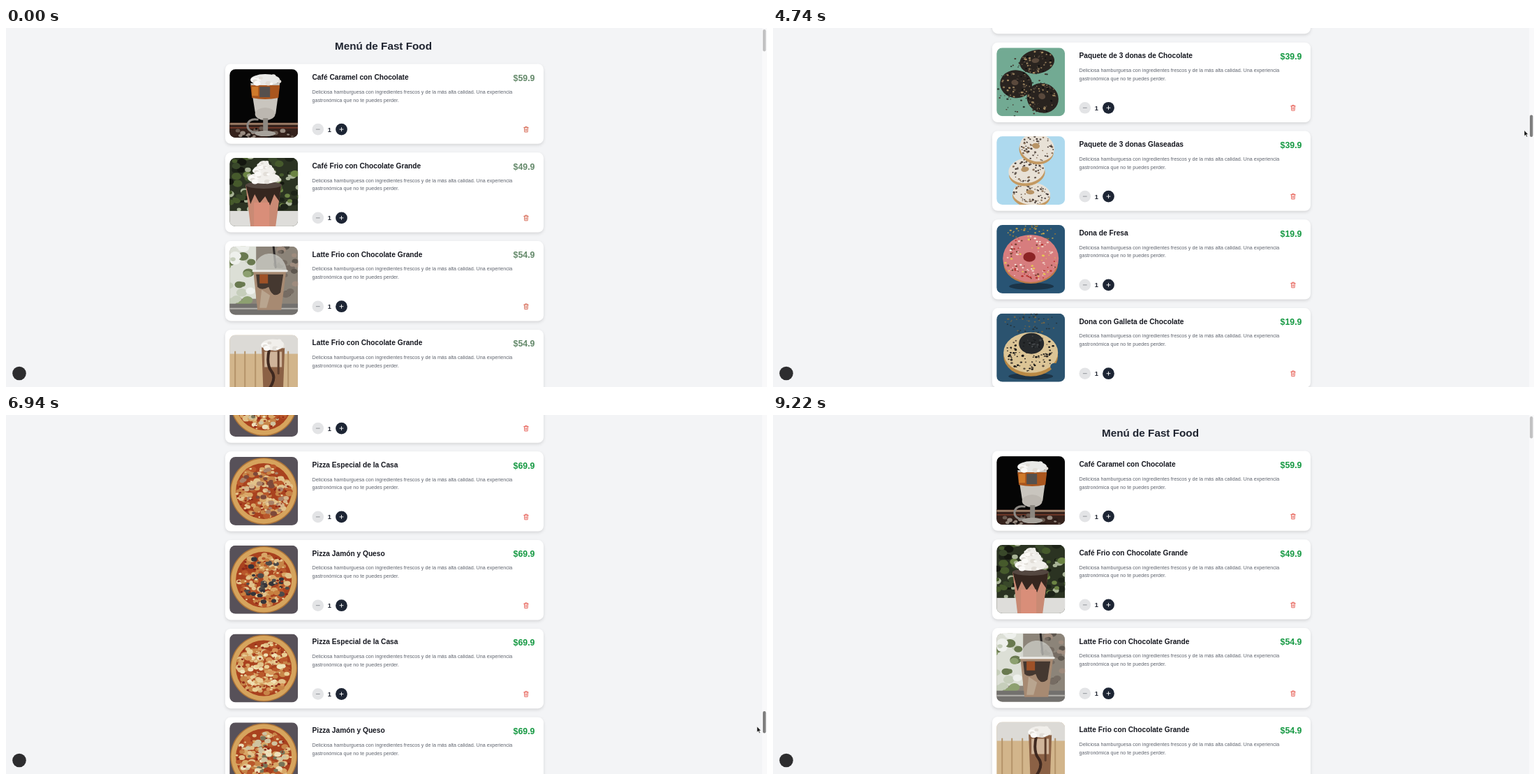
Recreate the animation shown at these times as an HTML page. Size 1090x514 px, loop 9400 ms.

```html
<!DOCTYPE html>
<html lang="es">
<head>
<meta charset="utf-8">
<title>Menú</title>
<style>
html, body { margin: 0; width: 100%; height: 100%; overflow: hidden; background: #f3f4f6; }
svg { position: fixed; inset: 0; width: 100%; height: 100%; display: block; }
text { font-family: "Liberation Sans", Arial, sans-serif; }
.heading { font-size: 15.25px; font-weight: 700; fill: #1f2430; }
.title { font-size: 10.2px; font-weight: 700; fill: #15171f; }
.desc { font-size: 7.16px; fill: #5f646e; }
.price { font-size: 12.3px; font-weight: 700; text-anchor: end; fill: var(--price); }
.count { font-size: 9.3px; font-weight: 700; text-anchor: middle; fill: #1f2430; }
.trash { fill: none; stroke: var(--trash); stroke-width: .85; stroke-linecap: round; stroke-linejoin: round; }
.panel { filter: drop-shadow(0 2.5px 2px rgba(0, 0, 0, .12)); }
</style>
</head>
<body>
<svg id="stage" viewBox="0 0 1090 514" xmlns="http://www.w3.org/2000/svg">
  <defs><clipPath id="photo"><rect width="98" height="98" rx="8.5"/></clipPath></defs>
  <rect width="1090" height="514" fill="#f3f4f6"/>
  <g id="page"><text class="heading" x="471" y="31">Menú de Fast Food</text></g>
  <rect x="1083" width="7" height="514" fill="#f9f9fa"/>
  <rect id="thumb" x="1084" width="4.4" height="31.5" rx="2.2"/>
  <circle cx="19" cy="494.5" r="9.8" fill="#2d2d2f"/>
  <path id="cursor" d="M0 0V8.3L1.9 6.6L3.2 9.6L4.6 9L3.3 6.1H5.8Z" fill="#111" stroke="#fff" stroke-width=".6"/>
</svg>
<script>
const LOOP = 9400, PITCH = 126.8, FIRST_TOP = 51.5, COUNT = 67, MAX_SCROLL = 8009.9;
const STEP = 92, STEP_ORIGIN = 3816;

// ---- drawing helpers -------------------------------------------------
function random(seed) {
  let s = seed * 7919 + 17;
  return () => (s = (s * 16807) % 2147483647) / 2147483647;
}
const box = (x, y, w, h, fill) => `<rect x="${x}" y="${y}" width="${w}" height="${h}" fill="${fill}"/>`;
const oval = (x, y, rx, ry, fill) => `<ellipse cx="${x}" cy="${y}" rx="${rx}" ry="${ry}" fill="${fill}"/>`;
const shape = (d, fill) => `<path d="${d}" fill="${fill}"/>`;
const line = (d, color, width) =>
  `<path d="${d}" fill="none" stroke="${color}" stroke-width="${width}" stroke-linecap="round" stroke-linejoin="round"/>`;
const turn = (angle, x, y, art) => `<g transform="translate(${x} ${y}) rotate(${angle})">${art}</g>`;

// Scatters small ovals over an elliptical area; inner is the empty part of the radius.
function scatter(seed, n, x, y, rx, ry, size, colors, inner = 0) {
  const rnd = random(seed);
  let art = '';
  for (let i = 0; i < n; i++) {
    const a = rnd() * Math.PI * 2, r = inner + (1 - inner) * Math.sqrt(rnd()), s = size * (.6 + rnd() * .8);
    art += oval((x + Math.cos(a) * r * rx).toFixed(1), (y + Math.sin(a) * r * ry).toFixed(1),
      s.toFixed(1), (s * .75).toFixed(1), colors[i % colors.length]);
  }
  return art;
}
const glass = (x1, x2, top, x3, x4, bottom, fill) => shape(`M${x1} ${top}H${x2}L${x4} ${bottom}H${x3}Z`, fill);
const foam = (x, y, rx, ry, color = '#f1efeb') =>
  oval(x, y, rx, ry, color) + scatter(5, 12, x, y, rx, ry, ry * .45, [color, '#e2ded8', '#fbfaf8']);
const straw = (d, dark, light) => line(d, light, 5) +
  `<path d="${d}" stroke="${dark}" stroke-width="5" stroke-dasharray="4 4" fill="none"/>`;
function donut(x, y, rx, ry, glaze, hole, sprinkles, seed, n = 55) {
  return oval(x, y, rx, ry, glaze) + scatter(seed, n, x, y, rx * .94, ry * .94, 1.3, sprinkles, .25) +
    oval(x - 2, y - 2, rx * .22, ry * .2, hole);
}
// A cake slice seen from above: tip, back corner and right corner of its top, then the side below.
function slice(tipX, tipY, backX, backY, endX, endY, depth) {
  return shape(`M${tipX} ${tipY}L${endX} ${endY}V${endY + depth}L${tipX + 3} ${tipY + depth}Z`, '#3f3e42') +
    line(`M${tipX + 2} ${tipY + depth / 2}L${endX} ${endY + depth / 2}`, '#6e6559', 2) +
    shape(`M${tipX} ${tipY}L${backX} ${backY}L${endX} ${endY}Z`, '#d9a860') +
    line(`M${tipX} ${tipY + 1}L${endX} ${endY + 1}`, '#ecca8f', 2) +
    oval(endX * .6 + backX * .4 - 4, endY * .6 + backY * .4 + 3, 7, 5, '#474346');
}

// ---- photos, each on a 98 x 98 square --------------------------------
const photos = {
  irish: () => box(0, 0, 98, 98, '#050505') + box(0, 76, 98, 22, '#35221c') + box(0, 77, 98, 2.5, '#a2836b') +
    box(0, 83, 98, 1.5, '#7e3f2c') + scatter(3, 36, 50, 92, 50, 8, 3, ['#17110f', '#6a5a50', '#2a1c18', '#978a80']) +
    line('M40 72C22 68 20 92 40 90', '#8d8984', 3) +
    glass(30, 72, 20, 37, 66, 64, '#c9c5be') + oval(51, 64, 14.5, 9, '#bcb7b0') +
    shape('M30 23H72L70 41Q51 45 32 41Z', '#a9561e') + box(43, 25, 15, 15, '#55504d') + box(32, 25, 9, 13, '#cf7a2b') +
    box(48, 70, 7, 19, '#8c8780') + oval(51, 92, 15, 4, '#a7a29b') + foam(51, 15, 21, 8, '#e9e9e7'),
  frappe: () => box(0, 0, 98, 98, '#2b3322') +
    scatter(8, 100, 49, 36, 58, 50, 5, ['#465a2c', '#1d2318', '#6c8444', '#39482a', '#a9b497', '#14170f']) +
    box(0, 76, 98, 22, '#deddda') + glass(23, 74, 38, 30, 66, 98, '#c98a74') +
    shape('M23 38H74L71 62L64 52L58 68L51 55L43 65L36 52L30 66Z', '#35261f') + box(35, 64, 22, 34, '#d98e79') +
    oval(49, 39, 26, 5, '#544740') + foam(49, 29, 23, 8) + foam(49, 18, 15, 8) + foam(49, 10, 8, 6),
  latte: () => box(0, 0, 98, 98, '#8c8479') + box(0, 0, 38, 75, '#dcdfd6') +
    scatter(4, 26, 15, 40, 24, 46, 6, ['#8da070', '#eef0ec', '#69794f', '#c6cebb']) +
    scatter(9, 26, 84, 34, 18, 36, 5, ['#766c63', '#9e8b7d', '#5e574f']) + box(0, 82, 98, 16, '#73716e') +
    line('M0 89H98', '#b3b1ac', 2) + glass(34, 81, 35, 40, 74, 91, '#a78a72') +
    shape('M38 40H77L73 66Q62 76 56 58Q46 64 40 58Z', '#453830') + box(43, 40, 12, 13, '#9e5127') +
    shape('M46 62L58 70L53 88H43Z', '#b9a58f') + line('M63 0L66 30', '#292524', 3) +
    shape('M34 35C37 2 78 2 82 35Z', '#d4d5d0b0') + line('M34 35H82', '#ecebe7', 3),
  fence: () => box(0, 0, 98, 98, '#d2b58b') + box(0, 0, 98, 27, '#dcdad6') +
    [8, 22, 37, 84].map(x => line(`M${x} 24V98`, '#b5946a', 2)).join('') +
    glass(46, 79, 18, 49, 76, 98, '#8b6145') + box(50, 24, 25, 22, '#cfb49a') +
    line('M57 20Q52 42 60 52T56 78', '#3e281f', 4) + line('M70 24V55', '#5c3d2c', 3) + foam(62, 14, 16, 8),
  tall: () => box(0, 0, 98, 98, '#77757b') + scatter(6, 50, 49, 40, 55, 50, 5, ['#6b696f', '#838188']) +
    box(0, 87, 98, 11, '#54392c') + glass(23, 72, 5, 32, 65, 94, '#a5a09c') + glass(27, 68, 19, 33, 63, 84, '#b48657') +
    line('M51 10Q46 38 53 62', '#251b1a', 5) + foam(48, 15, 19, 7) + line('M68 97L94 94', '#a03a25', 2),
  mocha: () => box(0, 0, 98, 98, '#b4b8c1') + box(0, 88, 98, 10, '#5f4538') + line('M60 1L52 11', '#403c3b', 3) +
    glass(8, 57, 13, 14, 51, 90, '#cbbfb1') + glass(10, 55, 22, 15, 50, 85, '#ab804f') +
    glass(27, 40, 26, 29, 38, 84, '#57504f') + line('M45 28L43 80', '#c59b68', 4) + oval(33, 17, 22, 5, '#e0cdb3') +
    scatter(3, 26, 70, 83, 28, 6, 5, ['#8a5329', '#b57a42', '#4f2f1e', '#6c3d23']),
  capuchino: () => box(0, 0, 98, 98, '#26242b') + box(0, 68, 98, 30, '#403f47') +
    shape('M27 11H87C84 55 82 89 60 91C38 90 31 48 27 11Z', '#55535a') +
    shape('M32 20H80C79 57 75 82 55 82C40 79 34 48 32 20Z', '#d8b88a') +
    shape('M60 24H80C79 57 75 78 58 81Q54 52 60 24Z', '#55535a') +
    oval(57, 12, 29, 4, '#b9b6b6') + oval(56, 20, 24, 4, '#efdfc0') +
    line('M87 12C85 50 82 78 66 88M27 12C30 50 36 80 50 88', '#c2c0c3', 1.3),
  caramel: () => box(0, 0, 98, 98, '#e7e5e1') + box(0, 78, 98, 20, '#f0eeea') +
    shape('M76 48L98 35V82L80 84Z', '#bd8953') + straw('M27 15L52 53', '#80522f', '#ead8c0') +
    glass(38, 87, 50, 44, 80, 98, '#8c6141') + glass(41, 83, 62, 46, 77, 96, '#453a35') + box(56, 77, 6, 19, '#8a3d2a') +
    oval(62, 52, 25, 7, '#d4c0a5') + foam(62, 42, 22, 10) + foam(63, 27, 15, 10) +
    scatter(8, 40, 62, 34, 21, 18, 2, ['#bb843f', '#dfb876', '#cda66b']),
  cream: () => box(0, 0, 98, 98, '#bcbabb') + straw('M5 0L30 38', '#a83528', '#eee3dc') +
    glass(28, 88, 43, 36, 78, 98, '#9e704c') + foam(59, 36, 28, 13) + foam(62, 26, 21, 9),
  choco3: () => box(0, 0, 98, 98, '#72aa93') + scatter(2, 75, 38, 55, 38, 45, 1.2, ['#2c3931', '#473b32']) +
    [[58, 20, 25, 17, -8], [28, 52, 23, 20, 6], [66, 72, 23, 21, 24]].map(([x, y, rx, ry, a], i) =>
      turn(a, x, y, donut(0, 0, rx, ry, '#29231f', '#5a493c', ['#a68a60', '#4c4036', '#8a7656', '#111'], 20 + i))).join(''),
  glazed3: () => box(0, 0, 98, 98, '#add9ee') +
    [[50, 82, 27, 16, 4], [43, 49, 26, 18, -8], [58, 16, 25, 20, 12]].map(([x, y, rx, ry, a], i) =>
      turn(a, x, y, oval(0, 4, rx, ry, '#c39962') + donut(0, 0, rx, ry, '#e8e1d6', '#b89466', ['#453a36', '#8a725a', '#655950'], 30 + i))).join(''),
  pink: () => box(0, 0, 98, 98, '#285474') + scatter(4, 55, 50, 13, 34, 13, 1.2, ['#bca04e', '#8b743d']) +
    oval(50, 88, 32, 5, '#1b3448') + oval(49, 55, 39, 29, '#bd7947') +
    donut(49, 48, 40, 34, '#d77d7e', '#8c2425', ['#e7c554', '#f3e5dc', '#b7312c', '#efc8bd', '#754030'], 8, 110),
  cookie: () => box(0, 0, 98, 98, '#2b536f') + scatter(4, 60, 49, 14, 37, 15, 1.2, ['#6f6549', '#253641']) +
    oval(49, 90, 32, 5, '#1d3447') + oval(49, 61, 39, 29, '#b98945') + oval(49, 56, 39, 29, '#dcc596') +
    scatter(12, 100, 49, 57, 36, 26, 1.4, ['#26221f', '#594e40', '#151515']) + oval(50, 43, 18, 15, '#272a2c') +
    scatter(6, 24, 50, 42, 14, 11, 1.3, ['#44484a', '#171a1c']) + oval(83, 76, 6, 5, '#2b536f'),
  hotdog: () => box(0, 0, 98, 98, '#47464a') + oval(52, 88, 56, 14, '#2b2324') + line('M4 88Q38 97 84 91', '#962c22', 4) +
    [[36, 30], [68, 62]].map(([x, y], i) => turn(-32, x, y,
      oval(0, 11, 44, 13, '#b87838') + scatter(6 + i, 30, 0, 14, 40, 8, 3, ['#7da044', '#a2b856', '#55722d', '#c9b266']) +
      oval(0, -9, 43, 11, '#d9aa62') + oval(0, -12, 34, 5, '#e6c283') + oval(0, 1, 46, 9, '#a9482a') + oval(-3, -2, 36, 3, '#cf6e40') +
      line('M-37 0L-28 -6L-23 5L-14 -6L-8 5L0 -6L6 5L14 -6L20 5L28 -6L35 3', '#efcb70', 2.8))).join(''),
  cake: () => box(0, 0, 98, 98, '#55545a') + box(0, 0, 34, 24, '#706477') +
    slice(6, 30, 34, 2, 50, 20, 18) + slice(52, 25, 62, 0, 98, 4, 18) +
    slice(0, 67, 24, 26, 54, 46, 24) + slice(36, 76, 62, 32, 98, 46, 24),
  waffle: () => box(0, 0, 98, 98, '#343538') + shape('M0 0H75L98 70V98H50L0 82Z', '#a9a8a6') +
    oval(49, 60, 47, 35, '#94602d') + oval(49, 52, 46, 35, '#c08a45') +
    [-28, -14, 0, 14, 28].map(d => line(`M${25 + d} 30L${51 + d} 80M${18 + d} 72L${70 + d} 32`, '#91602f', 2.2)).join('') +
    scatter(2, 60, 49, 54, 43, 31, 2.2, ['#a8723a', '#d19e58', '#7b4a28', '#b88343']) +
    scatter(7, 44, 46, 38, 34, 20, 3.2, ['#252638', '#3a3842', '#6d2a27', '#1d1d28']) + foam(65, 40, 20, 12) +
    scatter(9, 18, 60, 33, 22, 14, 2.2, ['#a9342a', '#2f3041', '#c66541']),
  croissant: () => box(0, 0, 98, 98, '#535255') + scatter(5, 12, 53, 10, 40, 6, 2.5, ['#252a36', '#34343b']) +
    oval(50, 66, 49, 31, '#1e1d20') + oval(50, 62, 43, 25, '#2d2b2e') +
    [[70, 34, 28], [36, 52, 25]].map(([x, y, a]) => turn(a, x, y,
      shape('M-32 14C-34 -20 18 -30 36 13C22 10 6 19 -3 21C-12 17 -20 12 -32 14Z', '#c58845') +
      [-20, -6, 9, 22].map(d => line(`M${d} -11Q${d + 7} 2 ${d - 2} 13`, '#8a4f2a', 1.8) +
        line(`M${d + 5} -9Q${d + 9} 0 ${d + 5} 6`, '#e3b873', 3)).join('') +
      scatter(a, 16, 0, 4, 26, 11, 2, ['#a9652f', '#d59a55', '#6e3822']))).join('') +
    scatter(3, 9, 25, 93, 20, 4, 2, ['#9c3324', '#27262a']),
  burger: () => box(0, 0, 98, 98, '#4a4039') + box(0, 78, 98, 20, '#735039') + oval(49, 75, 36, 13, '#bf7e3d') +
    oval(49, 65, 39, 10, '#4d2c20') + line('M12 58Q20 65 28 58T44 58T60 58T76 58T88 58', '#789748', 6) +
    shape('M13 53H86L64 66L50 57Z', '#e1aa45') + shape('M12 54C14 10 84 10 87 54Z', '#c98743') +
    scatter(4, 24, 49, 34, 27, 13, 1.3, ['#ebd4a3']),
  pizza: (k) => {
    const plate = k === COUNT - 1;
    const toppings = [['#cfc3a0', '#777458', '#eee0bb'], ['#a98168', '#d6b58a', '#7d493a'],
      ['#34343a', '#c78040', '#4d4a49'], ['#efe1b5', '#d79559', '#e9cf95']][(k + 1) % 4];
    return box(0, 0, 98, 98, plate ? '#211f20' : '#575159') + (plate ? oval(49, 50, 52, 51, '#bcbbbb') : '') +
      oval(49, 49, 48, 48, '#ad7439') + oval(49, 49, 46.5, 46.5, '#d6a45d') + oval(49, 49, 40, 40, '#a9421f') +
      scatter(k, 120, 49, 49, 37, 37, 4, ['#d8a767', '#e1c28b', '#c78548', '#b9582b']) +
      scatter(k + 50, 46, 49, 49, 36, 36, 3.5, toppings) + scatter(k + 9, 50, 49, 49, 39, 39, 1.6, ['#8e2919', '#e9cc96']);
  }
};

// ---- menu ------------------------------------------------------------
const known = {
  0: 'Café Caramel con Chocolate|59.9|irish', 1: 'Café Frio con Chocolate Grande|49.9|frappe',
  2: 'Latte Frio con Chocolate Grande|54.9|latte', 3: 'Latte Frio con Chocolate Grande|54.9|fence',
  6: 'Café Frio con Chocolate|54.9|tall', 7: 'Café Mocha Caliente Grande con Chocolate|59.9|mocha',
  8: 'Café Caliente Capuchino Grande|59.9|capuchino', 9: 'Café Mocha Caliente Mediano|49.9|caramel',
  10: 'Café Mocha Frio con Caramelo Mediano|49.9|cream', 16: 'Paquete de 3 donas de Chocolate|39.9|choco3',
  17: 'Paquete de 3 donas Glaseadas|39.9|glazed3', 18: 'Dona de Fresa|19.9|pink',
  19: 'Dona con Galleta de Chocolate|19.9|cookie', 47: 'Paquete 2 Hot Dogs|69.9|hotdog',
  48: '4 Rebanadas de Pay de Queso|69.9|cake', 49: 'Waffle Especial|49.9|waffle',
  50: 'Croissants De la casa.jpg|39.9|croissant', 63: 'Pizza Vegetales y Queso|69.9|pizza',
  64: 'Pizza Pepperoni y Queso|69.9|pizza', 65: 'Pizza Aceitunas y Queso|69.9|pizza',
  66: 'Pizza Queso, Jamón y Champiñones|69.9|pizza'
};
const sections = [
  [15, ['Café Latte Caliente Mediano|49.9|capuchino', 'Café Frio con Caramelo|54.9|caramel', 'Latte Frio Mediano|49.9|latte']],
  [26, ['Dona Glaseada|19.9|pink', 'Dona de Chocolate|19.9|cookie', 'Paquete de 3 donas|39.9|choco3']],
  [42, ['Hamburguesa Clásica|59.9|burger', 'Hamburguesa con Queso|69.9|burger', 'Hamburguesa Doble|79.9|burger']],
  [54, ['Hot Dog Especial|39.9|hotdog', 'Pay de Queso|49.9|cake', 'Waffle con Fresas|49.9|waffle']],
  [COUNT, ['Pizza Especial de la Casa|69.9|pizza', 'Pizza Jamón y Queso|69.9|pizza']]
];
function menuItem(k) {
  const options = sections.find(([end]) => k < end)[1];
  return (known[k] || options[k % options.length]).split('|');
}

function card(k) {
  const [title, price, photo] = menuItem(k);
  const g = document.createElementNS('http://www.w3.org/2000/svg', 'g');
  g.setAttribute('transform', `translate(314 ${(FIRST_TOP + k * PITCH).toFixed(1)})`);
  g.innerHTML = `<rect class="panel" width="456" height="114.3" rx="8" fill="#fff"/>
    <g transform="translate(6.2 7.6)"><g clip-path="url(#photo)">${photos[photo](k)}</g></g>
    <text class="title" x="124.5" y="22.6">${title}</text>
    <text class="price" x="443.4" y="24.3">$${price}</text>
    <text class="desc" x="124.5" y="42.4">Deliciosa hamburguesa con ingredientes frescos y de la más alta calidad. Una experiencia</text>
    <text class="desc" x="124.5" y="54.1">gastronómica que no te puedes perder.</text>
    ${oval(132.8, 93.6, 8.3, 8.3, '#e3e4e6')}${line('M130.3 93.6H135.3', '#8a8d92', .9)}
    <text class="count" x="149.4" y="97">1</text>
    ${oval(166.5, 93.6, 8.4, 8.4, '#1d2534')}${line('M164 93.6H169M166.5 91.1V96.1', '#fff', .9)}
    <path class="trash" d="M427.7 91.1H434.2M429.6 91V89.8H432.3V91M428.4 91.2L428.8 97.5H433.1L433.5 91.2M430.1 93V95.8M431.8 93V95.8"/>`;
  return g;
}

const byId = id => document.getElementById(id);
const stage = byId('stage'), page = byId('page'), thumb = byId('thumb'), cursor = byId('cursor');
const cards = Array.from({ length: COUNT }, (_, k) => page.appendChild(card(k)));

// ---- motion: [time, value] keys --------------------------------------
const scrollKeys = [[3380, 0], [3816, 849.6], [4320, 1700], [4420, 1700], [4736, 2059.6], [4820, 2140],
  [4960, 2140], [5720, 4900], [5960, 4900], [6208, 5998.1], [6820, 7100], [6940, 7100], [7588, MAX_SCROLL],
  [8080, MAX_SCROLL], [8900, 0]];
const cursorX = [[1480, 1091], [2400, 969], [2520, 969], [2940, 1084], [3816, 1084], [4736, 1076],
  [6208, 1071], [7588, 1081], [8900, 1081], [9020, 1092]];
const cursorY = [[1480, 230], [2400, 91.5], [2520, 91.5], [2940, 24]];

function at(keys, t) {
  if (t <= keys[0][0]) return keys[0][1];
  for (let i = 1; i < keys.length; i++) {
    const [t0, a] = keys[i - 1], [t1, b] = keys[i];
    if (t <= t1) return a + (b - a) * (t - t0) / (t1 - t0);
  }
  return keys[keys.length - 1][1];
}

function draw(time) {
  const t = STEP_ORIGIN + Math.floor((time - STEP_ORIGIN) / STEP) * STEP;
  const scroll = at(scrollKeys, t);
  const thumbY = 2 + scroll / MAX_SCROLL * 476;
  page.setAttribute('transform', `translate(0 ${-scroll})`);
  cards.forEach((g, k) => {
    const y = FIRST_TOP + k * PITCH - scroll;
    g.style.display = y > -125 && y < 520 ? '' : 'none';
  });
  thumb.setAttribute('y', thumbY);
  thumb.setAttribute('fill', time > 2920 && time < 8980 ? '#7f7f7f' : '#c2c2c3');
  const y = t < 2940 ? at(cursorY, t) : thumbY + 22;
  cursor.setAttribute('transform', `translate(${at(cursorX, t)} ${y})`);
  cursor.style.display = time >= 1480 && time < 9020 ? '' : 'none';
  const muted = time < 480;
  stage.style.setProperty('--price', muted ? '#64896a' : '#169943');
  stage.style.setProperty('--trash', muted ? '#d4604a' : '#e5584f');
}

function tick() {
  draw(performance.now() % LOOP);
  requestAnimationFrame(tick);
}
tick();
</script>
</body>
</html>
```
